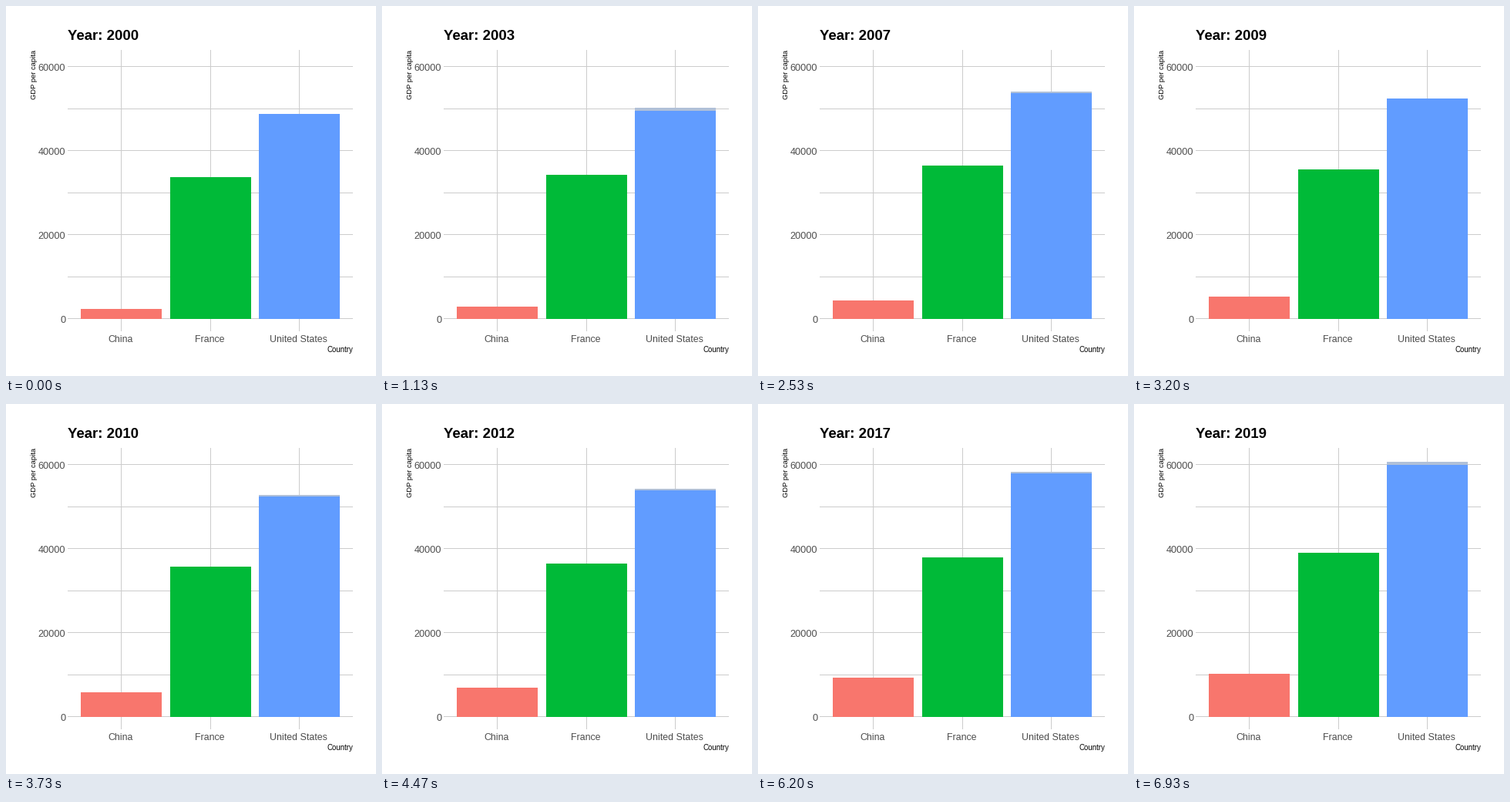
These frames come from a looping animation (480 px wide and 480 px high, 10 s). A matplotlib script:

```python
import math

import numpy as np
import matplotlib.pyplot as plt
from matplotlib.animation import FuncAnimation
from matplotlib.patches import Rectangle

SIZE, DPI = 480, 100
FRAMES, LOOP_MS = 150, 10000
LAST = 104              # step at which the final year is reached
LAG = 3                 # steps until a fresh edge turns solid
BASE, FLOOR = 405.5, 406
PX_PER_K = 5.45         # pixels per thousand
BAR_W = 105
GRID, INK, RIM = "#cccccc", "#4d4d4d", "#b0c0d8"

# name: left edge, label centre, colour, turning points (years since 2000, thousands)
BARS = {
    "China": (97, 149, "#f8766d",
              [(0, 2.2), (3, 2.8), (7, 4.35), (13, 7.1), (19, 10.16)]),
    "France": (213, 265, "#00ba38",
               [(0, 33.6), (3, 34.2), (7, 36.4), (8, 36.3), (9, 35.1),
                (11, 36.2), (15, 36.6), (19, 38.95)]),
    "United States": (328, 380, "#619cff",
                      [(0, 48.6), (2, 48.9), (5, 52.6), (7, 54.2), (8, 53.8),
                       (9, 51.9), (11, 53.3), (13, 54.6), (15, 56.7),
                       (17, 58.2), (19, 60.8)]),
}

fig = plt.figure(figsize=(SIZE / DPI, SIZE / DPI), dpi=DPI, facecolor="white")
ax = fig.add_axes([0, 0, 1, 1])
ax.set_xlim(0, SIZE)
ax.set_ylim(SIZE, 0)
ax.axis("off")


def box(x, y, w, h, color, z=1):
    return ax.add_patch(Rectangle((x, y), w, h, fc=color, lw=0,
                                  antialiased=False, zorder=z))


def label(x, y, text, px, color="black", **kw):
    return ax.text(x, y, text, fontsize=px * 72 / DPI, color=color,
                   family="Liberation Sans", va="baseline", **kw)


def row(thousands):
    return math.floor(BASE - thousands * PX_PER_K)


def year_at(step):
    return 19 * max(step, 0) / LAST


def top_at(name, step):
    return row(np.interp(year_at(step), *zip(*BARS[name][3])))


def set_span(rect, top, bottom):
    rect.set_y(top)
    rect.set_height(max(0, bottom - top))


for k in range(0, 61, 10):
    box(80, row(k), 370, 1, GRID)
    if k % 20 == 0:
        label(77.3, row(k) + 6, str(k * 1000), 12.7, INK, ha="right")

rects = {}
for name, (left, mid, color, _) in BARS.items():
    box(mid, 57, 1, 365, GRID)
    label(mid - 0.4, 436, name, 12.4, INK, ha="center")
    rects[name] = box(left, FLOOR, BAR_W, 0, color, 3)
rim = box(BARS["United States"][0], FLOOR, BAR_W, 0, RIM, 4)

label(450, 449, "Country", 9.7, ha="right")
label(39, 57, "GDP per capita", 9.4, ha="right", rotation=90,
      rotation_mode="anchor")
title = label(80, 44, "", 18.7, weight="bold")


def draw(i):
    step = min(i, LAST)
    title.set_text(f"Year: {2000 + round(year_at(step))}")
    for name, rect in rects.items():
        set_span(rect, top_at(name, step), FLOOR)
    # a rising blue bar carries a paler rim
    set_span(rim, top_at("United States", step),
             top_at("United States", step - LAG))
    return [title, rim, *rects.values()]


anim = FuncAnimation(fig, draw, frames=FRAMES, interval=LOOP_MS / FRAMES,
                     repeat=True, repeat_delay=0, blit=False)
plt.show()
```
